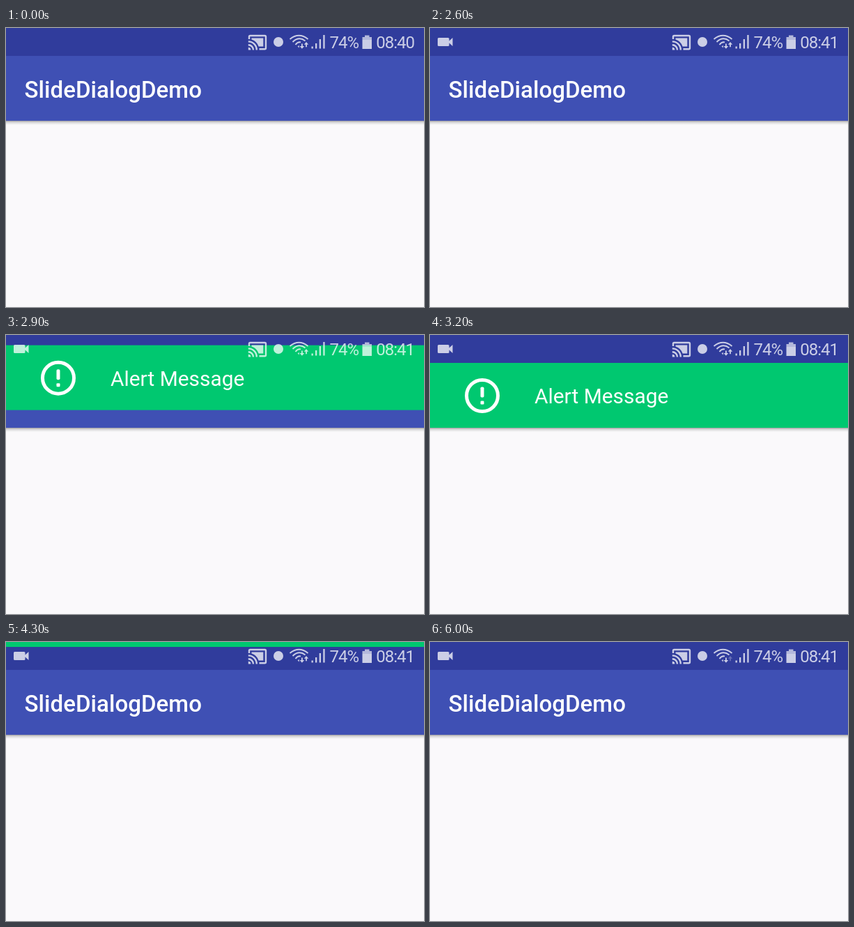
These frames come from a looping animation (600x400 px, 6.1 s). An HTML page:

```html
<!DOCTYPE html>
<html lang="en">
<head>
<meta charset="utf-8">
<title>Slide dialog</title>
<style>
  html, body { margin: 0; width: 100%; height: 100%; overflow: hidden; background: #faf9fb; }
  svg { display: block; width: 100%; height: 100%; }
  text { font-family: Roboto, sans-serif; fill: #fff; }
  .title { font-size: 33.1px; font-weight: 500; }
  .message { font-size: 29.9px; }
  .status { font-size: 24px; letter-spacing: -1px; }
  .line { fill: none; stroke: #fff; }
</style>
</head>
<body>
<svg viewBox="0 0 600 400">
  <defs>
    <linearGradient id="shadow" x2="0" y2="1">
      <stop offset="0" stop-color="#000" stop-opacity=".35"/>
      <stop offset=".4" stop-color="#000" stop-opacity=".13"/>
      <stop offset="1" stop-color="#000" stop-opacity="0"/>
    </linearGradient>
  </defs>

  <rect width="600" height="400" fill="#faf9fb"/>
  <rect y="133" width="600" height="6" fill="url(#shadow)"/>
  <rect width="600" height="40" fill="#303c9c"/>
  <rect y="40" width="600" height="93" fill="#3f50b4"/>
  <text class="title" x="26.6" y="99.5">SlideDialogDemo</text>

  <g id="dialog">
    <rect y="40" width="600" height="93" fill="#00c870"/>
    <circle class="line" cx="75" cy="87" r="22.5" stroke-width="5"/>
    <rect x="72.5" y="74.5" width="5" height="15" rx="1.8" fill="#fff"/>
    <rect x="72.5" y="94.5" width="5" height="5" rx="1.2" fill="#fff"/>
    <text class="message" x="150" y="98">Alert Message</text>
  </g>

  <g fill="#fff" opacity=".75">
    <path id="camera" d="M12.5 14H26q1.5 0 1.5 1.5V18.5L32.5 14V26L27.5 21.5V24.5q0 1.5-1.5 1.5H12.5q-1.5 0-1.5-1.5V15.5q0-1.5 1.5-1.5Z"/>

    <!-- screen casting -->
    <path class="line" stroke-width="2.4" d="M349 16V12.5q0-1.5 1.5-1.5H371.5q1.5 0 1.5 1.5V28.8q0 1.5-1.5 1.5H363.5M347.8 19.4a12 12 0 0 1 12 12M347.8 24.2a7.2 7.2 0 0 1 7.2 7.2"/>
    <path d="M347.8 27.8a3.6 3.6 0 0 1 3.6 3.6H347.8ZM352.5 14.6H369.3V26.6H362.6A15.6 15.6 0 0 0 352.5 16.6Z"/>

    <circle cx="391" cy="20" r="7"/>

    <!-- wireless and its traffic arrows -->
    <path class="line" stroke-width="1.9" d="M407.5 16Q420.5 5.5 433.5 16M411.5 20Q420.5 11.5 429.5 18.5M415.5 24Q419 19.5 423 20.5"/>
    <path d="M418.5 26.2L420.8 25V28.5Z"/>
    <path id="down" d="M424 22.5H425.8V26H428.2L424.9 29.7L421.6 26H424Z"/>
    <path id="up" d="M430.1 27.2H431.9V23.7H434.2L431 20L427.8 23.7H430.1Z"/>

    <path d="M438.5 26.5h2.3v3h-2.3ZM444 22h2.3v7.5h-2.3ZM449.7 16h2.3v13.5h-2.3ZM455.3 10h2.3v19.5h-2.3Z"/>

    <text class="status" x="464.6" y="29">74%</text>
    <path d="M515 10.5H521.5V13H525V17H511.5V13H515Z" opacity=".85"/>
    <path d="M511.5 17H525V30H511.5Z"/>
    <text class="status" id="clock" x="531.2" y="29"></text>
  </g>
</svg>
<script>
const LOOP = 6100, STEP = 100;
const SLIDE = 365, TRAVEL = 133;
const ENTER = 2640, LEAVE = 3989;
const part = id => document.getElementById(id);
const clamp = v => Math.min(1, Math.max(0, v));
const ease = v => (1 - Math.cos(Math.PI * clamp(v))) / 2;
const setOpacity = (id, value) => part(id).setAttribute("opacity", value);

function draw(t) {
  const shown = ease((t - ENTER) / SLIDE) - ease((t - LEAVE) / SLIDE);
  part("dialog").setAttribute("transform", `translate(0 ${(shown - 1) * TRAVEL})`);
  part("clock").textContent = t < 2600 ? "08:40" : "08:41";
  setOpacity("camera", clamp(t / 500));
  setOpacity("up", t < 5000 ? 1 : .35);
  setOpacity("down", t >= 5200 && t < 6000 ? .35 : 1);
}

function tick() {
  const t = performance.now() % LOOP;
  draw(Math.floor(t / STEP) * STEP);
  requestAnimationFrame(tick);
}
tick();
</script>
</body>
</html>
```
